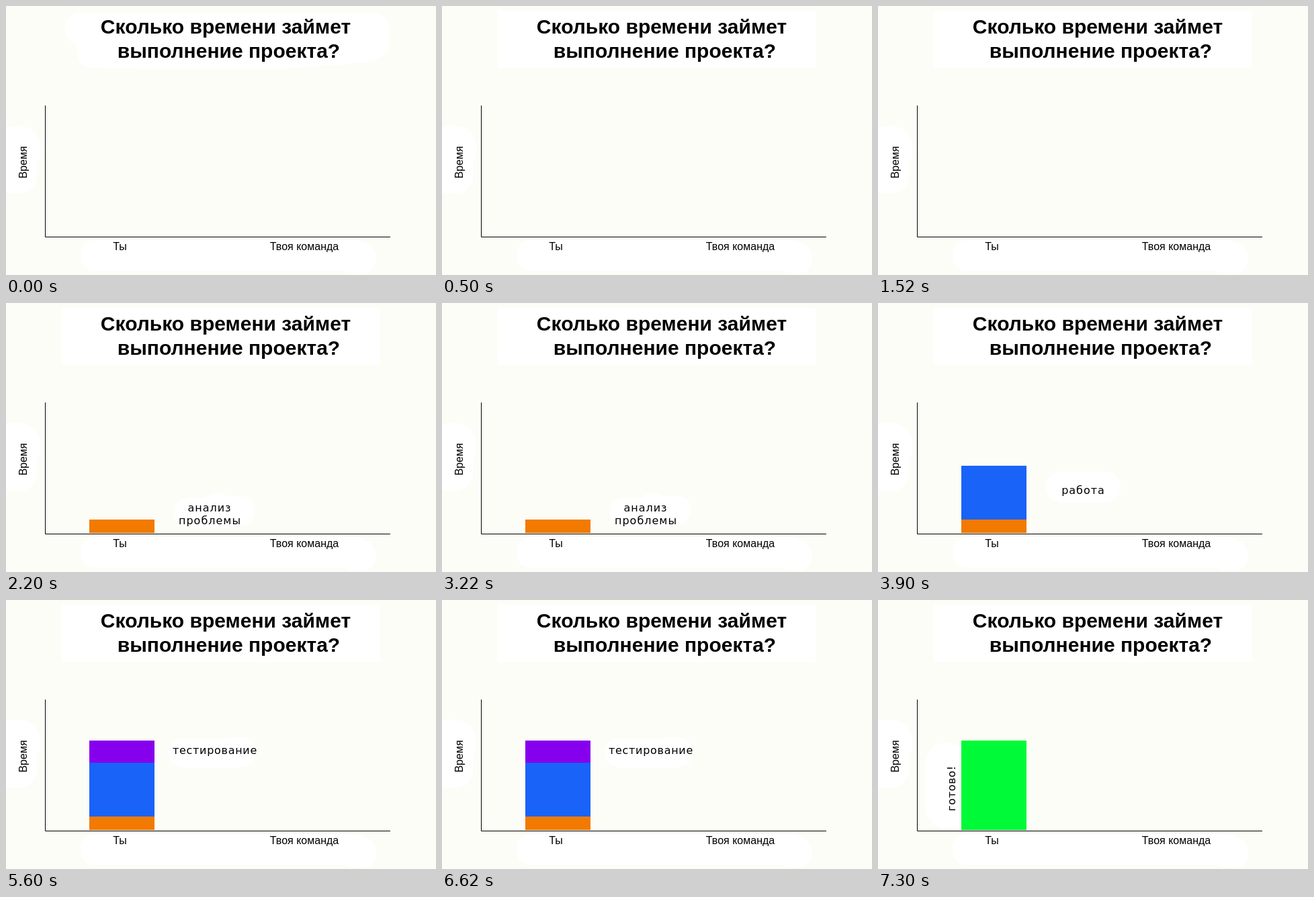
Write an HTML page that moves like this. It is 640 px wide and 400 px high and loops after 8000 ms.

```html
<!DOCTYPE html>
<html lang="ru">
<head>
<meta charset="utf-8">
<title>Сколько времени займет выполнение проекта?</title>
<style>
  html, body { margin: 0; width: 100%; height: 100%; overflow: hidden; background: #fdfdf7; }
  svg { display: block; width: 640px; height: 400px; }
  text { font: 16px "Liberation Sans", Arial, sans-serif; text-anchor: middle; }
  .title { font-size: 30px; font-weight: bold; }
  .note text { font-family: "DejaVu Sans", Verdana, sans-serif; letter-spacing: 1px; }
  .note .tight { letter-spacing: .7px; }
  .patch { fill: #fff; }
</style>
</head>
<body>
<svg viewBox="0 0 640 400">
  <!-- data-from / data-to: visible interval in ms -->
  <path class="patch" data-to="500" d="M108 10H546Q571 13 571 38V58Q568 77 537 83Q495 88 440 91Q390 96 340 94L132 92Q107 90 106 68L105 56Q88 51 88 34Q88 14 108 10Z"/>
  <rect class="patch" data-from="500" x="83" y="7" width="473" height="85"/>
  <text class="title" x="327" y="41">Сколько времени займет</text>
  <text class="title" x="331.5" y="77">выполнение проекта?</text>

  <path class="patch" d="M0 180Q8 178 20 178Q51 182 51 214Q51 226 47 233V246Q45 279 18 279Q6 279 0 277Z"/>
  <path class="patch" d="M133 348H520Q551 353 551 377Q549 398 526 398Q514 398 506 394H133Q111 391 111 371Q111 350 133 348Z"/>
  <text transform="translate(31 232.5) rotate(-90)">Время</text>
  <text x="169.5" y="363">Ты</text>
  <text x="444" y="363">Твоя команда</text>

  <g class="note" data-from="2200" data-to="3900">
    <path class="patch" d="M272 290H296Q303 283 314 283Q324 283 328 287H350Q370 290 370 309Q368 330 346 331Q334 336 318 334H272Q250 330 250 311Q251 292 272 290Z"/>
    <text x="303" y="310">анализ</text>
    <text x="303.5" y="329">проблемы</text>
  </g>
  <g class="note" data-from="3900" data-to="5600">
    <path class="patch" d="M270 251H340Q361 255 361 275Q359 295 337 297H274Q250 294 250 273Q251 254 270 251Z"/>
    <text x="305.5" y="284">работа</text>
  </g>
  <g class="note" data-from="5600" data-to="7300">
    <path class="patch" d="M262 206H326Q338 203 352 204Q373 208 373 227Q371 248 346 249H264Q242 246 242 226Q244 208 262 206Z"/>
    <text class="tight" x="311" y="229">тестирование</text>
  </g>
  <g class="note" data-from="7300">
    <path class="patch" d="M124 218Q112 213 98 213Q74 214 70 246V307Q75 338 100 340H124Z"/>
    <text class="tight" transform="translate(115 280) rotate(-90)">готово!</text>
  </g>

  <rect data-from="2200" data-to="7300" x="124" y="322" width="97" height="20" fill="#f27a00"/>
  <rect data-from="3900" data-to="7300" x="124" y="242" width="97" height="80" fill="#1a63f8"/>
  <rect data-from="5600" data-to="7300" x="124" y="209" width="97" height="33" fill="#8600ee"/>
  <rect data-from="7300" x="124" y="209" width="97" height="133" fill="#00fa38"/>

  <path d="M58.5 148V343.5H572" fill="none" stroke="#000"/>
</svg>
<script>
  const LOOP = 8000;
  const parts = [...document.querySelectorAll('[data-from], [data-to]')].map(el => ({
    el,
    from: +(el.dataset.from ?? 0),
    to: +(el.dataset.to ?? LOOP)
  }));

  function draw() {
    const t = performance.now() % LOOP;
    for (const { el, from, to } of parts) {
      el.style.display = t >= from && t < to ? '' : 'none';
    }
    requestAnimationFrame(draw);
  }
  draw();
</script>
</body>
</html>
```
